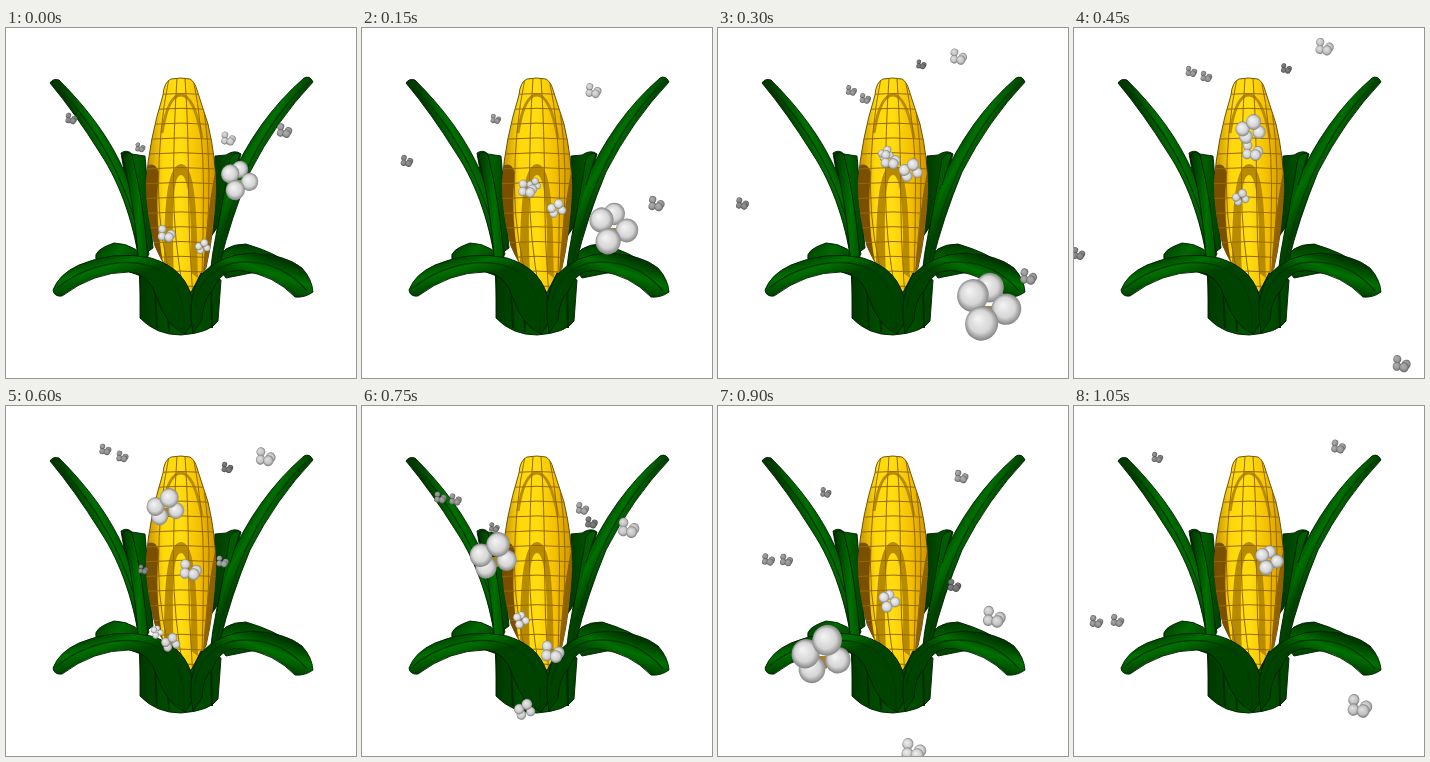
An HTML page with a canvas that plays this animation: 350 by 350 pixels, repeating every 1.2 s.

```html
<!DOCTYPE html>
<html lang="en">
<head>
<meta charset="utf-8">
<title>Popping corn</title>
<style>
html, body { margin: 0; width: 100%; height: 100%; overflow: hidden; background: #fff; }
canvas { display: block; }
</style>
</head>
<body>
<canvas id="stage" width="350" height="350"></canvas>
<script>
const ctx = document.getElementById("stage").getContext("2d");
const STEP = 150, STEPS = 8;

function shape(d, fill, stroke, width = 1) {
  const path = new Path2D(d);
  if (fill) { ctx.fillStyle = fill; ctx.fill(path); }
  if (stroke) { ctx.strokeStyle = stroke; ctx.lineWidth = width; ctx.stroke(path); }
}

function gradient(x0, y0, x1, y1, ...colors) {
  const g = ctx.createLinearGradient(x0, y0, x1, y1);
  colors.forEach((c, i) => g.addColorStop(i / (colors.length - 1), c));
  return g;
}

const COB = "M165 51Q175 49 184 51Q189 54 191 62L202 96Q210 130 210 162Q208 205 200 240L185 264Q160 246 149 218Q140 185 140 155Q143 112 157 67Q158 54 165 51Z";

function drawCob() {
  shape(COB, gradient(140, 0, 211, 0, "#c58e00", "#ffd80a", "#ffdc10", "#f4bf00", "#cb9000"), "#443300", 0.8);
  ctx.save();
  ctx.clip(new Path2D(COB));
  // Shadows cast by the leaves
  shape("M139 139Q149 132 153 145Q148 190 158 240L150 240Q138 195 139 139Z", "#7a5000");
  shape("M211 135Q201 180 197 245L212 245Z", "#8e6200");
  shape("M156 105Q162 67 175 67Q188 67 196 110", null, "#b98c00", 3);
  shape("M158 245C158 185 160 137 175 136C190 137 191 185 192 250L185 245C186 195 184 147 175 147C166 147 166 190 168 248Z", "#b88a00");
  ctx.strokeStyle = "#946900";
  ctx.lineWidth = 1;
  for (let y = 65; y < 260; y += 14.8) {
    ctx.beginPath();
    ctx.moveTo(138, y + 2);
    ctx.quadraticCurveTo(175, y - 1, 212, y + 2);
    ctx.stroke();
  }
  for (let i = -2; i <= 2; i++) {
    const x = 175 + (i - 0.5) * 15;
    shape(`M${175 + (i - 0.5) * 8} 50Q${x} 100 ${x} 160Q${x} 210 ${182 + (i - 0.5) * 9} 264`, null, "#946900");
  }
  shape("M198 82Q207 140 200 220", null, "#946900");
  ctx.restore();
}

function leaf(d, x0, y0, x1, y1, light = "#007000") {
  shape(d, gradient(x0, y0, x1, y1, "#003800", light, "#004200"), "#001d00", 0.9);
}

function drawBackLeaves() {
  leaf("M115 125Q121 121 126 126L139 128L147 220L133 230Z", 115, 0, 145, 0, "#006000");
  leaf("M209 128L220 127Q229 121 235 126L218 190L204 210Z", 207, 0, 235, 0, "#004d00");
  leaf("M90 231Q87 222 108 215Q130 215 150 240L140 250Z", 90, 215, 125, 245, "#006900");
  leaf("M210 236Q215 216 240 216Q270 225 285 237L220 250Z", 230, 215, 230, 250, "#006400");
}

function drawFrontLeaves() {
  leaf("M44 55Q47 50 53 52C81 80 104 110 119 145Q134 185 143 226L134 240C129 200 116 158 94 125Q69 85 44 55Z", 84, 125, 112, 112);
  shape("M49 56C86 94 119 143 138 226", null, "#003900", 1.4);
  leaf("M116 128Q121 121 126 127Q137 170 142 230L149 290L135 288Q133 190 116 128Z", 118, 0, 147, 0);
  leaf("M298 50Q304 47 307 54Q270 93 244 144Q225 190 214 235L204 247Q208 205 223 155Q250 92 298 50Z", 237, 110, 263, 125);
  shape("M303 53Q234 119 210 238", null, "#003c00", 1.4);
  shape("M224 157L234 126Q229 123 224 131L211 205", "#005c00", "#002600");
  // Base and curled leaves
  leaf("M134 235L134 290Q150 307 175 307Q204 305 212 293L215 252L195 245L185 265L160 241Z", 134, 0, 214, 0, "#005700");
  shape("M148 245L151 300M160 252L163 304M205 253L206 300", null, "#002900", 2);
  leaf("M47 262Q53 246 73 237Q108 222 145 230Q182 241 187 276Q191 292 179 306Q161 299 151 270Q143 245 123 244Q88 244 56 268Q48 269 47 262Z", 100, 224, 108, 252);
  shape("M51 260C86 231 143 224 166 253Q180 272 178 303", null, "#003b00", 1.5);
  leaf("M187 305Q180 273 194 248Q213 226 247 225Q280 227 296 240Q306 251 307 264Q299 270 289 269Q268 247 237 243Q215 240 207 262Q197 271 196 292Z", 248, 224, 239, 250);
  shape("M189 280Q192 245 227 235Q272 229 301 263", null, "#003b00", 1.5);
}

// Each kernel: size range, brightness, lobe angles, then [step, x, y] keys.
const SLANT = [225, 140, 15, 55], OPEN = [15, 127, 188, -72];
const kernel = (from, to, tone, lobes, ...keys) => ({ from, to, tone, lobes, keys });
const kernels = [
  kernel(4.5, 6, 130, SLANT, [2, 203, 36], [3, 212, 40], [4, 221, 61], [5, 229, 116], [6, 236, 179]),
  kernel(4.5, 6, 165, SLANT, [0, 134, 119], [2, 133, 62], [3, 117, 43], [4, 99, 43], [5, 78, 91], [7, 22, 215]),
  kernel(5, 6, 165, SLANT, [2, 147, 70], [3, 132, 48], [4, 116, 50], [5, 93, 93], [7, 43, 214]),
  kernel(4.5, 6, 150, SLANT, [4, 137, 163], [5, 132, 121], [7, 83, 51], [8, 65, 90], [10, 24, 175], [11, 4, 225]),
  kernel(5.5, 8, 175, SLANT, [4, 216, 155], [5, 220, 102], [6, 243, 70], [7, 264, 40], [8, 278, 102], [10, 310, 248], [11, 327, 335]),
  kernel(6.5, 11, 225, SLANT, [0, 222, 110], [1, 231, 62], [2, 240, 28], [3, 250, 18], [4, 259, 50], [5, 266, 121], [7, 285, 299]),
  kernel(6, 9, 235, OPEN, [1, 172, 157], [2, 168, 126], [3, 167, 170], [4, 165, 237], [5, 163, 304]),
  kernel(8, 11, 240, SLANT, [0, 160, 205], [1, 165, 160], [2, 172, 131], [3, 178, 122], [4, 184, 163], [5, 190, 245], [6, 195, 343]),
  kernel(6.5, 25, 245, OPEN, [0, 197, 219], [2, 193, 143], [3, 177, 102], [4, 160, 102], [5, 132, 151], [6, 104, 250]),
  kernel(5.5, 28, 245, [275, 10, 215, 110], [4, 151, 226], [5, 159, 214], [6, 171, 195], [7, 195, 154], [8, 233, 152], [9, 251, 200], [10, 270, 278])
];

function ball(x, y, r, tone) {
  const gray = v => `rgb(${v},${v},${v})`;
  const g = ctx.createRadialGradient(x - r * 0.25, y - r * 0.3, 0, x, y, r);
  g.addColorStop(0, gray(tone));
  g.addColorStop(0.65, gray(tone * 0.87 | 0));
  g.addColorStop(1, gray(tone * 0.53 | 0));
  ctx.fillStyle = g;
  ctx.beginPath();
  ctx.ellipse(x, y, r * 0.95, r, 0.3, 0, 7);
  ctx.fill();
}

function drawKernel({ from, to, tone, lobes, keys }, step) {
  const first = keys[0][0], last = keys[keys.length - 1][0];
  if (step < first) step += STEPS;
  if (step > last) return;
  const next = Math.max(1, keys.findIndex(k => k[0] >= step));
  const [t0, x0, y0] = keys[next - 1], [t1, x1, y1] = keys[next];
  const u = (step - t0) / (t1 - t0);
  const x = x0 + (x1 - x0) * u, y = y0 + (y1 - y0) * u;
  const size = from * (to / from) ** ((step - first) / (last - first));
  if (size > 14) {
    ctx.fillStyle = "#a68132";
    ctx.fillRect(x - size * 0.3, y, size * 0.5, size * 0.5);
  }
  lobes.forEach((deg, i) => {
    const a = deg * Math.PI / 180, reach = size * 0.66;
    ball(x + Math.cos(a) * reach, y + Math.sin(a) * reach, size * (0.53 + 0.03 * i), tone);
  });
}

function draw(now) {
  const step = Math.floor(now / STEP) % STEPS;
  ctx.fillStyle = "#fff";
  ctx.fillRect(0, 0, 350, 350);
  drawBackLeaves();
  drawCob();
  drawFrontLeaves();
  kernels.forEach(k => drawKernel(k, step));
}

const start = performance.now();
function tick() {
  draw(performance.now() - start);
  requestAnimationFrame(tick);
}
tick();
</script>
</body>
</html>
```
